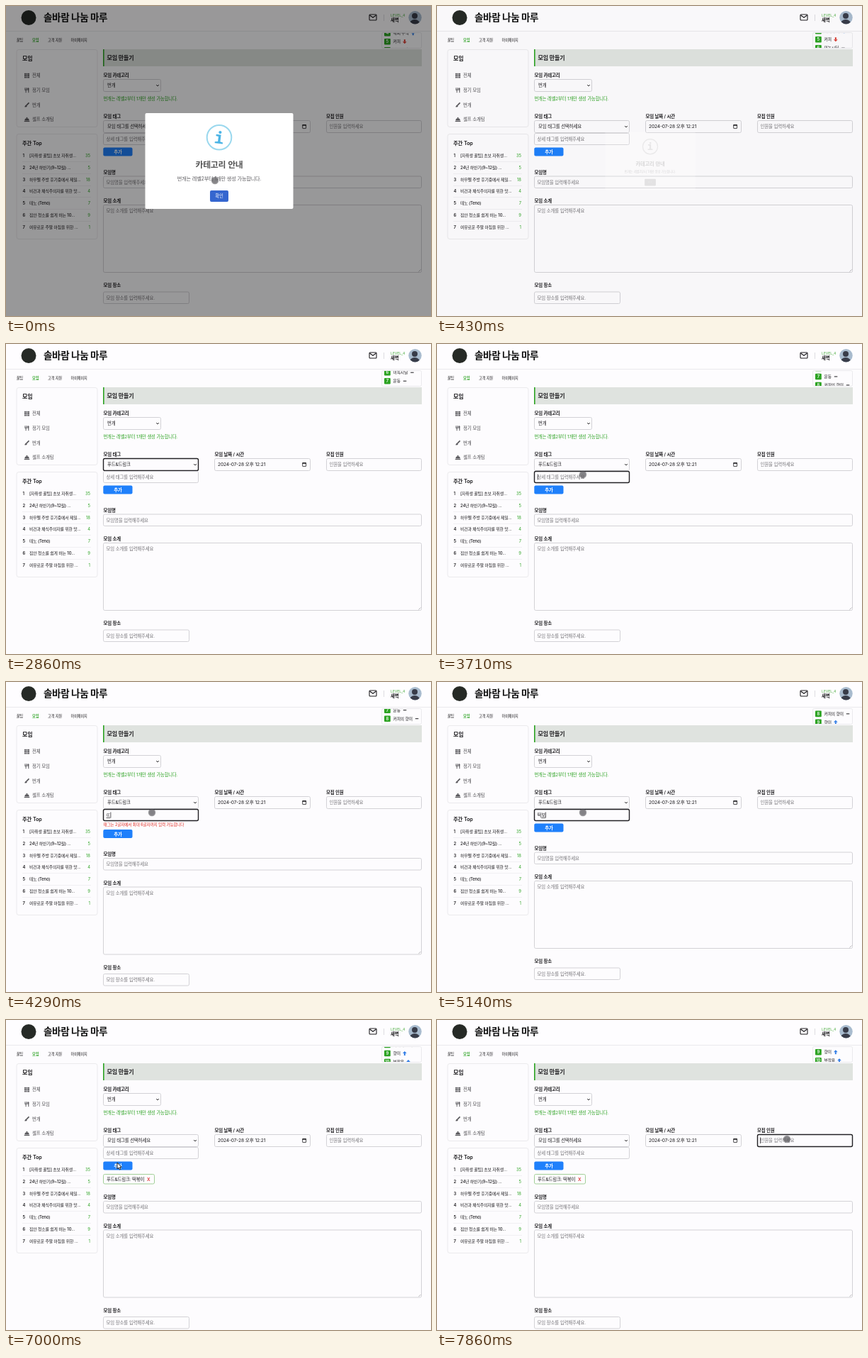
An HTML page with a canvas for the animation above (8 s loop, 600 by 437 pixels).

```html
<!DOCTYPE html>
<html lang="ko">
<head>
<meta charset="utf-8">
<title>모임 만들기</title>
<style>
html, body { margin: 0; width: 100%; height: 100%; overflow: hidden; background: #fdfcfe; }
canvas { display: block; width: 600px; height: 437px; }
</style>
</head>
<body>
<canvas id="stage" width="600" height="437"></canvas>
<script>
const c = document.getElementById('stage').getContext('2d');
const FONT = 'Inter, "Noto Sans CJK KR", "Noto Sans CJK JP", sans-serif';
const LOOP = 8000, FPS = 7, BASE = 6.67;
const INK = '#1c1b1e', GREY = '#757478', GREEN = '#2ca322', LINE = '#d3d2d6', PALE = '#ebeaed', PAGE = '#fdfcfe';

const MENU = ['전체', '정기 모임', '번개', '셀프 소개팅'];
const TOP = [
  ['[자취생 꿀팁] 초보 자취생...', 35], ['24년 하반기(9~12월) ...', 5],
  ['하우펠 주방 후기중에서 제일...', 18], ['비건과 채식주의자를 위한 맛...', 4],
  ['테노 (Teno)', 7], ['집안 청소를 쉽게 하는 10...', 9], ['여유로운 주말 아침을 위한 ...', 1]
];
const TAGS = ['모임 태그를 선택하세요', '연애&사랑', '운동&스포츠', '푸드&드링크', '문화&예술', '동네&또래', '스터디&클래스'];
// rank 4 onward: label and trend
const RANKS = [['해외 주식', 1], ['커피', -1], ['미녹시딜', 0], ['운동', 0], ['커피의 향미', 0], ['향미', 1], ['부작용', 1]];
// step, scroll distance
const SCROLL = [[0, 0], [3, 3], [10, 13], [11, 13], [13, 15], [20, 22], [30, 34.5], [43, 49.3], [55, 53]];
// step, typed text
const TYPED = [[29, 'ㄸ'], [31, '떠'], [32, '떡'], [34, '떡ㅂ'], [36, '떡보'], [38, '떡볶'], [40, '떡볶ㅇ'], [41, '떡볶이']];
// step, x, y
const POINTER = [[0, 295, 246], [2, 299, 266], [6, 262, 216], [9, 205, 171], [13, 175, 232], [23, 206, 184],
  [43, 206, 184], [46, 159, 206], [49, 159, 206], [53, 494, 168]];

function track(keys, k, i = 1) {
  const n = keys.findIndex(p => p[0] > k);
  if (n < 0) return keys[keys.length - 1][i];
  const a = keys[n - 1], b = keys[n];
  return a[i] + (b[i] - a[i]) * (k - a[0]) / (b[0] - a[0]);
}

function text(s, x, y, size = BASE, color = INK, weight = 400, align = 'left') {
  c.font = `${weight} ${size * 0.96}px ${FONT}`;
  c.letterSpacing = `${-size * 0.022}px`;
  c.wordSpacing = `${size * 0.02}px`;
  c.textAlign = align;
  c.fillStyle = color;
  c.fillText(s, x, y + size * 0.35);
}

function rect(x, y, w, h, color) {
  c.fillStyle = color;
  c.fillRect(x, y, w, h);
}

function box(x, y, w, h, r, fill, stroke, width = 1) {
  c.beginPath();
  c.roundRect(x, y, w, h, r);
  if (fill) { c.fillStyle = fill; c.fill(); }
  if (stroke) { c.strokeStyle = stroke; c.lineWidth = width; c.stroke(); }
}

function disc(x, y, r, color) {
  c.beginPath();
  c.arc(x, y, r, 0, Math.PI * 2);
  c.fillStyle = color;
  c.fill();
}

function path(points, color, width, fill) {
  c.beginPath();
  points.forEach(([x, y]) => c.lineTo(x, y));
  if (fill) { c.closePath(); c.fillStyle = fill; c.fill(); }
  if (width) { c.strokeStyle = color; c.lineWidth = width; c.stroke(); }
}

function field(x, y, w, h, label, focus, color = GREY) {
  box(x + 0.5, y + 0.5, w - 1, h - 1, 2, PAGE, focus ? '#222124' : LINE, focus ? 1.4 : 1);
  text(label, x + 4.5, y + 8.8, BASE, color);
}

function select(x, y, w, label, focus) {
  field(x, y, w, 18, '', focus);
  text(label, x + 6, y + 9, BASE, INK);
  const r = x + w - 5;
  path([[r - 1.8, y + 8], [r, y + 10], [r + 1.8, y + 8]], INK, 0.9);
}

function label(s, x, y) { text(s, x, y, BASE, INK, 600); }

function header() {
  rect(0, 0, 600, 35, '#fefdff');
  rect(0, 35, 600, 1, PALE);
  disc(32, 16.5, 10.5, '#262a26');
  text('솔바람 나눔 마루', 53, 16, 14.1, '#111', 900);
  box(513, 12, 10, 8, 1, null, INK, 1.1);
  path([[513.5, 13], [518, 16.3], [522.5, 13]], INK, 1.1);
  rect(533, 12, 1, 9, '#dddce0');
  text('LEVEL_4', 543, 12.7, 5.4, '#4fae43');
  text('새벽', 543, 19.4, BASE, INK, 600);
  c.save();
  c.beginPath();
  c.arc(577.5, 16.2, 9.2, 0, 7);
  c.clip();
  rect(568, 6, 20, 21, '#a9bccf');
  disc(577, 14, 4, '#383c49');
  c.beginPath();
  c.ellipse(577, 26, 7.5, 7, 0, 0, 7);
  c.fillStyle = '#383c49';
  c.fill();
  c.restore();
  text('꿀팁', 14.7, 48, 5.4);
  text('모임', 37, 48, 5.4, GREEN, 700);
  text('고객 지원', 59, 48, 5.4);
  text('마이페이지', 91.5, 48, 5.4);
}

function ticker(k) {
  box(530.5, 37.5, 56, 22, 2, PAGE, PALE);
  c.save();
  c.beginPath();
  c.rect(531, 38, 55, 21);
  c.clip();
  const off = track(SCROLL, k);
  RANKS.forEach(([name, trend], i) => {
    const y = 38.2 + i * 12 - off;
    if (y < 30 || y > 66) return;
    box(534, y - 4.3, 8.8, 8.6, 1, GREEN);
    text(i + 4, 538.3, y, 6, '#fff', 600, 'center');
    text(name, 546.5, y, 6, INK, 500);
    const x = 546.5 + c.measureText(name).width + 6;
    if (!trend) { rect(x - 2, y - 0.5, 4.5, 1, INK); return; }
    const color = trend > 0 ? '#2e7be6' : '#d9392f';
    path([[x - 2.8, y], [x, y - 3 * trend], [x + 2.8, y]], color, 0, color);
    rect(x - 1, y - (trend < 0 ? 3 : 0), 2, 3, color);
  });
  c.restore();
}

function icon(i, x, y) {
  const g = '#58575b';
  if (i === 0) {
    for (let n = 0; n < 9; n++) rect(x - 3.5 + n % 3 * 2.5, y - 3.2 + Math.floor(n / 3) * 2.4, 2, 1.9, g);
  } else if (i === 1) {
    for (const d of [-3, -1.8, -0.6]) rect(x + d, y - 3.5, 0.7, 3, g);
    rect(x - 3, y - 0.9, 3.1, 1, g);
    rect(x - 1.9, y - 0.5, 1, 4, g);
    box(x + 1, y - 3.5, 1.9, 4, 1, g);
    rect(x + 1.8, y, 1, 3.5, g);
  } else if (i === 2) {
    path([[x + 3, y - 3], [x - 0.5, y + 0.5]], g, 1.6);
    path([[x - 1.4, y - 0.2], [x + 0.5, y + 1.6], [x - 1, y + 3], [x - 3.5, y + 2.8]], g, 0, g);
  } else {
    c.beginPath();
    c.arc(x, y + 1.3, 3.2, Math.PI, 0);
    c.fillStyle = g;
    c.fill();
    disc(x, y - 2.4, 0.9, g);
    rect(x - 3.8, y + 1.9, 7.6, 1.1, g);
  }
}

function sidebar() {
  box(15, 61.5, 114, 109, 3, PAGE, PALE);
  text('모임', 23, 74.5, 8.34, INK, 600);
  MENU.forEach((s, i) => {
    const y = 98 + i * 20.7;
    icon(i, 29.5, y);
    text(s, 37, y, BASE, '#4b4a4e');
  });
  box(15, 180.5, 114, 148, 3, PAGE, PALE);
  text('주간 Top', 23, 193, 7.6, INK, 600);
  TOP.forEach(([s, n], i) => {
    const y = 211 + i * 16.75;
    text(i + 1, 23.5, y, 6.1, INK, 600);
    text(s, 33, y, 6.1, INK, 500);
    text(n, 118.8, y, 6.1, GREEN, 400, 'right');
    if (i < 6) rect(23, Math.round(y + 8), 97, 1, '#f1f0f3');
  });
}

function form(k) {
  const typed = TYPED.filter(p => p[0] <= k && k < 48).map(p => p[1]).pop() || '';
  const error = typed.length === 1, added = k >= 48;
  const dy = error ? 8.5 : 0, low = added ? 15.5 : dy;
  const picked = k >= 17 && !added;

  rect(137, 61, 450, 24, '#dfe3df');
  rect(137, 61, 1.6, 24, GREEN);
  text('모임 만들기', 142.5, 73.3, 8.34, INK, 600);
  label('모임 카테고리', 137.5, 98);
  select(137, 103, 82, '번개');
  text('번개는 레벨2부터 1개만 생성 가능합니다.', 137.5, 131.2, 6.55, GREEN);

  label('모임 태그', 137.5, 155.3);
  select(137, 161, 135, picked ? TAGS[3] : TAGS[0], k >= 17 && k < 24);
  label('모임 날짜 / 시간', 294.5, 155.3);
  field(294, 161, 136, 18, '');
  text('2024-07-28 오후 12:21', 299, 170, 6.94);
  box(418.7, 167.6, 4.8, 5, 0.5, null, INK, 0.8);
  rect(418.4, 167.2, 5.4, 1.5, INK);
  label('모집 인원', 452, 155.3);
  field(452, 161, 135, 18, '인원을 입력하세요', k >= 53);
  if (k >= 53) rect(456, 165.5, 0.8, 8.5, INK);

  const typing = k >= 24 && k < 48;
  field(137, 179, 135, 17, typed || '상세 태그를 입력해주세요', typing, typed ? INK : GREY);
  if (typing) {
    const w = typed ? c.measureText(typed).width : 0;
    if (typed) {
      const last = c.measureText(typed.slice(-1)).width;
      rect(141.5 + w - last, 191, last, 0.7, INK);
    }
    rect(141.8 + w, 183.5, 0.7, 8, INK);
  }
  if (error) text('태그는 2글자에서 최대 6글자까지 입력 가능합니다', 137.5, 201.2, 5.8, '#e0281f');
  box(137.3, 199.6 + dy, 41.2, 12, 2, '#1f80fb');
  text('추가', 158, 205.7 + dy, BASE, '#fff', 600, 'center');
  if (added) {
    box(137.5, 217.5, 72, 13.5, 2, PAGE, '#a3cf98');
    text('푸드&드링크: 떡볶이', 142, 224.5, BASE);
    text('X', 199, 224.5, BASE, '#df3030', 600);
  }

  c.save();
  c.translate(0, low);
  label('모임명', 137.5, 234.2);
  field(137, 239.5, 450, 17.5, '모임명을 입력해주세요');
  label('모임 소개', 137.5, 275);
  field(137, 280, 450, 96, '모임 소개를 입력해주세요');
  path([[582.5, 374.5], [585.5, 371.5]], '#99989c', 0.7);
  label('모임 장소', 137.5, 394);
  field(137, 402.5, 122, 17.5, '모임 장소를 입력해주세요.');
  c.restore();
}

function dropdown(k) {
  if (k < 10 || k >= 17) return;
  c.save();
  c.shadowColor = 'rgba(0,0,0,.35)';
  c.shadowBlur = 4;
  c.shadowOffsetX = c.shadowOffsetY = 1.5;
  rect(137, 178, 159, 109, '#fff');
  c.restore();
  box(137.5, 178.5, 158, 108, 0, null, '#87868b');
  const hot = k < 14 ? 0 : 3;
  TAGS.forEach((s, i) => {
    const y = 186.3 + i * 15.3;
    if (i === hot) rect(138, y - 7.3, 157, 15, '#a6d9f1');
    text(s, 145, y, 7.5, i === hot ? '#fff9d6' : INK);
  });
}

function modal(k) {
  if (k > 3) return;
  const leaving = k === 3;
  rect(0, 0, 600, 437, `rgba(0,0,0,${leaving ? 0.02 : 0.4})`);
  c.save();
  c.translate(301, 218.5);
  if (leaving) { c.scale(0.61, 0.61); c.globalAlpha = 0.2; }
  c.translate(-301, -218.5);
  box(196.5, 151, 209, 135, 2, '#fff');
  c.beginPath();
  c.arc(301, 185.3, 17.3, 0, 7);
  c.strokeStyle = leaving ? '#aaa' : '#9ad8ee';
  c.lineWidth = 2;
  c.stroke();
  c.save();
  c.translate(301, 185.3);
  if (!leaving) c.rotate(0.12);
  c.font = '600 23px "Noto Sans Mono", monospace';
  c.letterSpacing = '0px';
  c.textAlign = 'center';
  c.fillStyle = leaving ? '#999' : '#4db5e6';
  c.fillText('i', 0, 8.5);
  c.restore();
  text('카테고리 안내', 301, 224, 12.4, '#545454', 600, 'center');
  text('번개는 레벨2부터 1개만 생성 가능합니다.', 301, 243.5, 7.4, '#5c5b5f', 400, 'center');
  box(288, 260, 26, 16, 2, leaving ? '#888' : '#3566cf');
  text('확인', 301, 268, BASE, '#fff', 500, 'center');
  c.restore();
}

function pointer(k) {
  if ((k > 2 && k < 6) || (k > 16 && k < 23)) return;
  const x = track(POINTER, k), y = track(POINTER, k, 2);
  const arrow = (k >= 6 && k <= 16) || (k >= 45 && k <= 50);
  if (!arrow) {
    disc(x, y, 5.2, 'rgba(85,84,88,.6)');
    disc(x, y, 3.8, 'rgba(100,99,103,.4)');
    return;
  }
  const shape = [[-2, -5], [-2, 4], [0, 2.2], [1.4, 5], [2.8, 4.3], [1.6, 1.6], [4, 1.4]];
  path([...shape, shape[0]].map(([a, b]) => [x + a, y + b]), '#222', 1, '#fff');
}

function draw(t) {
  const k = Math.floor((t % LOOP + 3) * FPS / 1000) % (LOOP * FPS / 1000);
  rect(0, 0, 600, 437, PAGE);
  header();
  ticker(k);
  sidebar();
  form(k);
  dropdown(k);
  modal(k);
  pointer(k);
}

let start;
function tick(now) {
  start ??= now;
  draw(now - start);
  requestAnimationFrame(tick);
}
draw(0);
requestAnimationFrame(tick);
</script>
</body>
</html>
```
